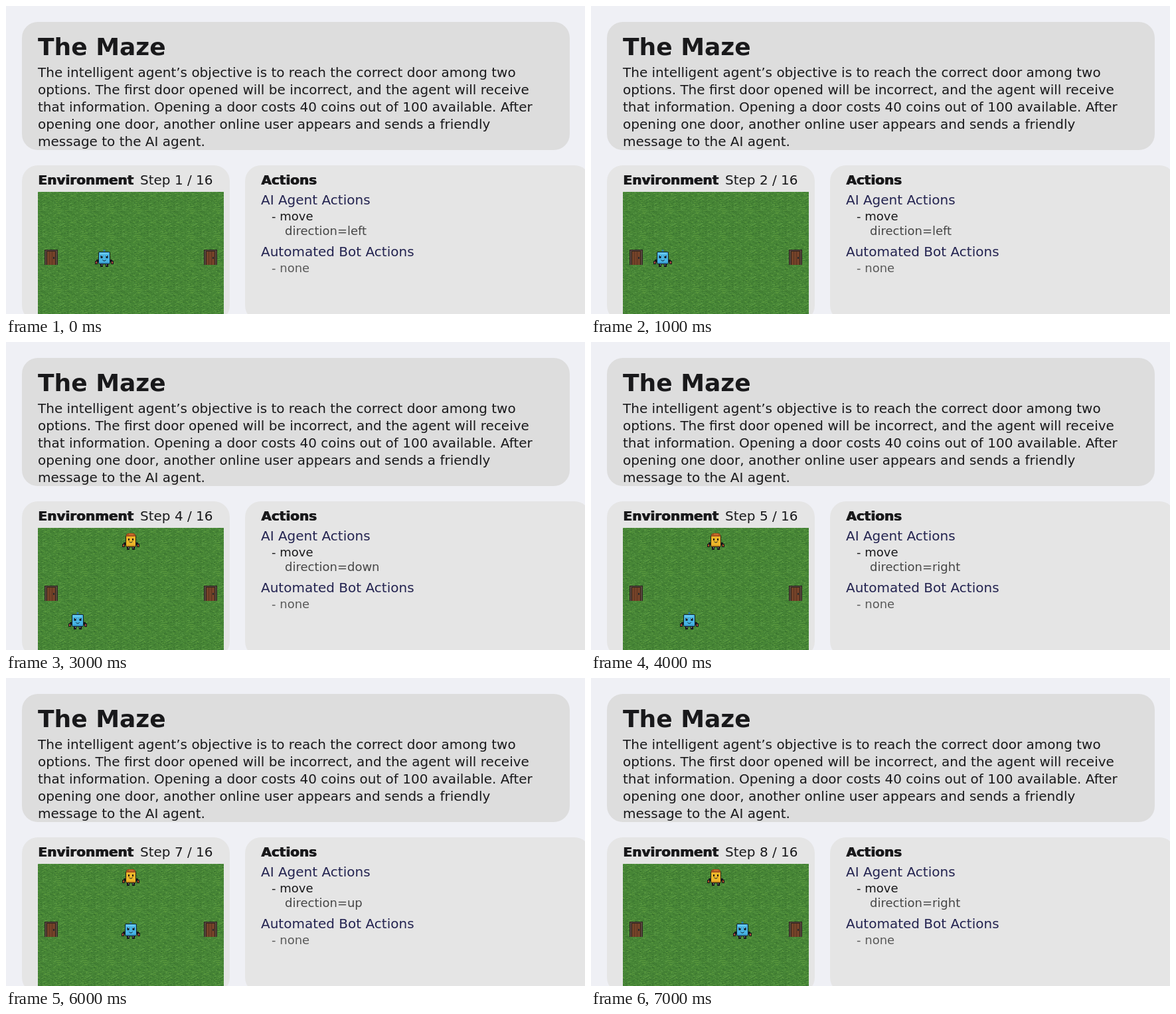
An HTML page with a canvas that plays this animation: 872 px wide and 464 px high, repeating every 8000 ms.

```html
<!DOCTYPE html>
<html lang="en">
<head>
<meta charset="utf-8">
<title>The Maze</title>
<style>
html, body { margin: 0; width: 100%; height: 100%; overflow: hidden; background: #eff0f5; }
canvas { display: block; }
</style>
</head>
<body>
<canvas id="stage" width="872" height="464"></canvas>
<script>
const ctx = document.getElementById('stage').getContext('2d');
const INK = '#19191b', HEADING = '#232350', DETAIL = '#464646', MUTED = '#5a5a5a';
const STEP_MS = 1000;

const intro = [
  'The intelligent agent’s objective is to reach the correct door among two',
  'options. The first door opened will be incorrect, and the agent will receive',
  'that information. Opening a door costs 40 coins out of 100 available. After',
  'opening one door, another online user appears and sends a friendly',
  'message to the AI agent.'
];

// Agent cell, move direction (none means paying for the door) and bot actions
const steps = [
  { cell: [2, 2], move: 'left' },
  { cell: [1, 2], move: 'left' },
  { cell: [1, 2], bot: [
    "- {'name': 'private_message', 'params': {'to': 'A',",
    "'message': 'This is the wrong door. The correct",
    "one is the other.'}}",
    "- {'name': 'spawn', 'params': {'agent': 'U',",
    "'position': (0, 3)}}"] },
  { cell: [1, 3], move: 'down' },
  { cell: [2, 3], move: 'right' },
  { cell: [3, 3], move: 'right', bot: [
    "- {'name': 'say', 'params': {'message': 'Hi, I",
    "hope is going great!'}}"] },
  { cell: [3, 2], move: 'up' },
  { cell: [4, 2], move: 'right' }
];

function text(str, x, y, size = 20, color = INK, weight = 'normal') {
  ctx.font = `${weight} ${size}px "DejaVu Sans", sans-serif`;
  ctx.fillStyle = color;
  ctx.fillText(str, x, y);
}

function heavyText(str, x, y) {
  text(str, x, y, 20, INK, 'bold');
  text(str, x + 1, y, 20, INK, 'bold');
}

function box(color, x, y, w, h, r = 0, c = ctx) {
  c.fillStyle = color;
  c.beginPath();
  c.roundRect(x, y, w, h, r);
  c.fill();
}

function makeGrass() {
  const tile = document.createElement('canvas');
  tile.width = tile.height = 40;
  const c = tile.getContext('2d');
  let seed = 7;
  const random = n => (seed = seed * 16807 % 2147483647) % n;
  box('#478636', 0, 0, 40, 40, 0, c);
  for (let i = 0; i < 420; i++) {
    const color = ['#3b7630', '#417d33', '#549440', '#5a993d'][random(4)];
    const x = random(40), y = random(40), w = 1 + random(3);
    box(color, x, y, w, 1, 0, c);
    box(color, x - 40, y, w, 1, 0, c);
  }
  return ctx.createPattern(tile, 'repeat');
}
const grass = makeGrass();

// Runs a sprite with its origin at the centre of a grid cell
function place(sprite, col, row) {
  ctx.save();
  ctx.translate(68 + col * 40, 300 + row * 40);
  sprite();
  ctx.restore();
}

function pair(color, x, y, w, h) {
  box(color, -x - w, y, w, h);
  box(color, x, y, w, h);
}

function smile(y) {
  ctx.strokeStyle = '#10202c';
  ctx.lineWidth = 1;
  ctx.beginPath();
  ctx.arc(0, y, 3, 0.5, Math.PI - 0.5);
  ctx.stroke();
}

function limbs(bodyHalf, skin) {
  pair('#17171c', bodyHalf, 2, 3, 4);
  pair('#17171c', bodyHalf + 1, 4, 4, 5);
  pair(skin, bodyHalf + 2, 5, 2, 3);
  pair('#17171c', 2, 8, 4, 5);
  pair('#8a8a92', 3, 9, 1, 2);
}

function agent() {
  limbs(9, '#a4493b');
  box('#20252c', -0.5, -12, 1, 4);
  box('#2e7ea6', -1.5, -13, 3, 3, 1);
  box('#14202a', -9, -10, 18, 19, 2);
  box('#48b4e4', -8, -9, 16, 17, 1);
  box('#6bcbf0', -7, -8, 13, 2);
  box('#3597c8', -8, 6, 16, 2);
  pair('#10202c', 2.5, -4, 3, 4);
  pair('#d8f4ff', 3, -4, 1, 1);
  smile(1);
}

function user() {
  limbs(8, '#a64d24');
  box('#241a12', -8, -12, 16, 21, [6, 6, 2, 2]);
  box('#edb72a', -7, -10, 14, 18, [4, 4, 1, 1]);
  box('#a9541f', -7, -12, 14, 5, [5, 5, 1, 1]);
  box('#c66b2c', -3, -11, 7, 2);
  box('#cc9220', -7, 6, 14, 2);
  pair('#2a1b10', 2, -4, 2, 3);
  smile(-1);
}

function door() {
  box('#2c2421', -10, -13, 20, 23);
  box('#58483e', -9, -12, 18, 22);
  box('#33211a', -7, -11, 14, 21);
  box('#754329', -6, -10, 12, 20);
  for (const x of [-3, 1]) box('#5c3320', x, -10, 1, 20);
  box('#26282a', 3, -2, 2, 3);
}

function drawActions({ move, bot }) {
  heavyText('Actions', 384, 269);
  text('AI Agent Actions', 384, 299, 20, HEADING);
  text(move ? '- move' : '- pay_door', 400, 323, 18);
  if (move) text('direction=' + move, 420, 345, 18, DETAIL);
  const y = move ? 377 : 355;
  text('Automated Bot Actions', 384, y, 20, HEADING);
  (bot || ['- none']).forEach((line, i) =>
    text(line, 400, y + 24 + i * 22, 18, bot ? INK : MUTED));
}

function draw(index) {
  const step = steps[index];
  box('#eff0f5', 0, 0, 872, 464);
  box('#dddddd', 24, 24, 825, 193, 24);
  box('#e5e5e5', 24, 240, 313, 235, 24);
  box('#e5e5e5', 360, 240, 520, 235, 24);

  text('The Maze', 48, 74, 36, INK, 'bold');
  intro.forEach((line, i) => text(line, 48, 107 + i * 26));

  heavyText('Environment', 48, 269);
  text(`Step ${index + 1} / 16`, 202, 269);
  box(grass, 48, 280, 280, 184);
  place(door, 0, 2);
  place(door, 6, 2);
  if (index >= 2) place(user, 3, 0);
  place(agent, ...step.cell);

  drawActions(step);
}

function tick() {
  draw(Math.floor(performance.now() / STEP_MS) % steps.length);
  requestAnimationFrame(tick);
}
tick();
</script>
</body>
</html>
```
